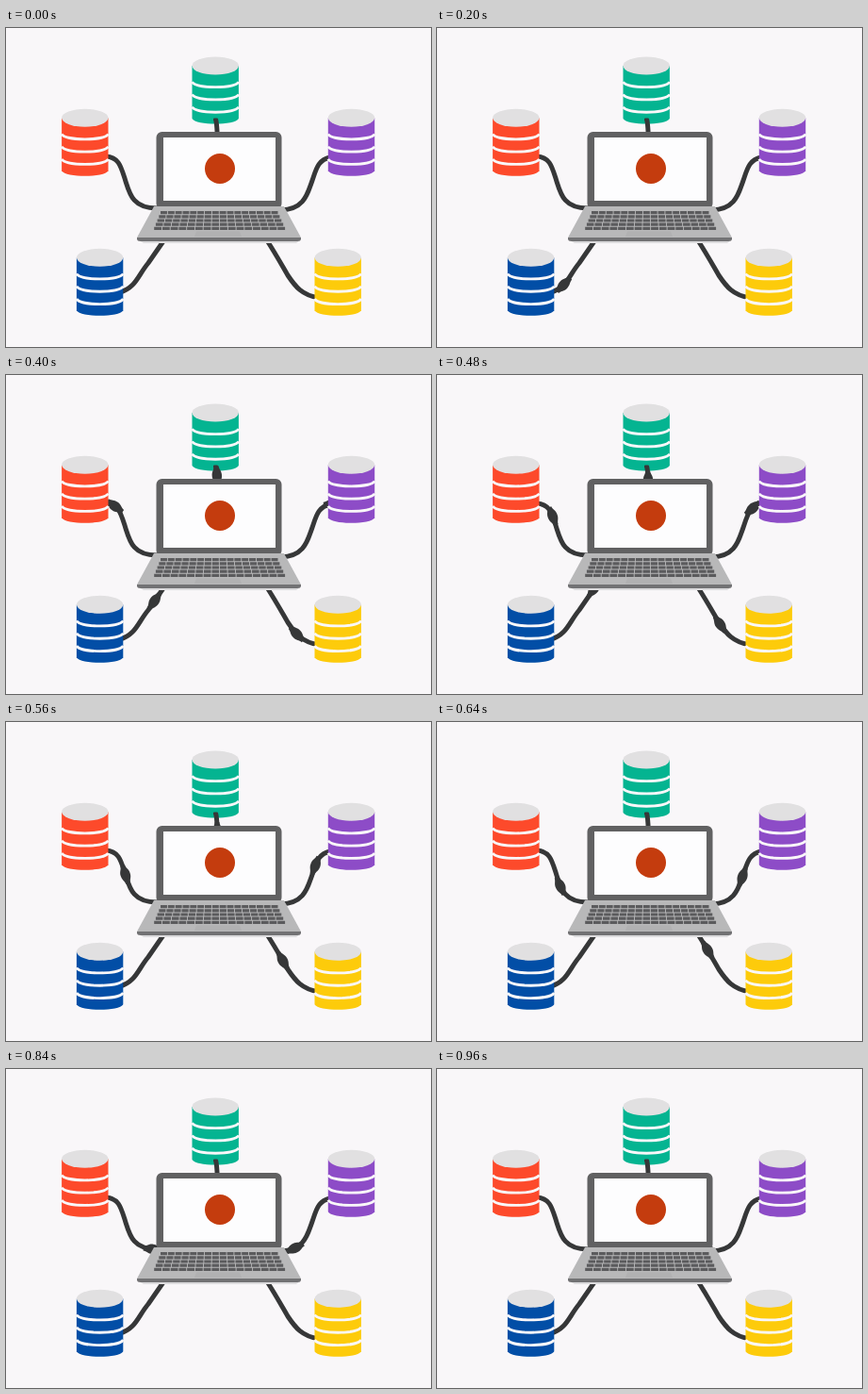
Recreate the animation shown at these times as an HTML page. Size 451 by 338 pixels, loop 1000 ms.

```html
<!DOCTYPE html>
<html lang="en">
<head>
<meta charset="utf-8">
<title>Databases feeding a laptop</title>
<style>
  html, body { margin: 0; width: 100%; height: 100%; overflow: hidden; background: #f9f7f9; }
  svg { display: block; width: 100vw; height: 100vh; }
  .cable { fill: none; stroke: #363738; stroke-width: 5; stroke-linecap: round; }
  .pulse { fill: #363738; }
  .gap { fill: none; stroke: #f9f7f9; stroke-width: 2.8; }
</style>
</head>
<body>
<svg viewBox="0 0 451 338" preserveAspectRatio="none">
  <clipPath id="below"><rect x="200" y="95.5" width="46" height="40"/></clipPath>
  <rect width="451" height="338" fill="#f9f7f9"/>
  <g id="back"></g>
  <g id="stores"></g>
  <g id="front" clip-path="url(#below)"></g>
  <g id="laptop">
    <path d="M141 225H312L308 228H146Z" fill="#dcdbdd"/>
    <rect x="159.5" y="110" width="133" height="82" rx="6" fill="#616162"/>
    <rect x="167" y="116" width="119" height="67" fill="#fdfdfe"/>
    <circle cx="227" cy="149" r="16" fill="#c43c0e"/>
    <path d="M157 189H295L313 222H139Z" fill="#b8b8b9"/>
    <path d="M139 222H313V223.5Q313 226 309 226H143Q139 226 139 223.5Z" fill="#727274"/>
    <g id="keys" stroke="#5b5b5d" stroke-width="3.2"></g>
    <path d="M202 215.5H248L250 221H200Z" fill="#b1b1b2"/>
  </g>
</svg>
<script>
const LOOP = 1000, STEP = 40;
const $ = id => document.getElementById(id);

function add(parent, tag, attrs) {
  const el = document.createElementNS("http://www.w3.org/2000/svg", tag);
  for (const k in attrs) el.setAttribute(k, attrs[k]);
  parent.append(el);
  return el;
}

const stores = [
  { x: 222.2, y: 30.5, color: "#04b491" },
  { x: 83.8, y: 85.7, color: "#fd4a2b" },
  { x: 366.5, y: 85.7, color: "#8d4cc7" },
  { x: 99.6, y: 233.8, color: "#024ea6" },
  { x: 352.2, y: 233.8, color: "#fdcb0b" }
];

// Speed is in pixels per millisecond along the cable
const cables = [
  { layer: "back", start: 75, speed: 0.2,
    d: "M112 282L121 280C138 275 140 262 151 249L169 223L175 214" },
  { layer: "back", start: 172, speed: 0.163,
    d: "M342 289L332 286C314 283 307 274 299 262C292 250 286 239 275 222L269 212" },
  { layer: "front", start: 240, speed: 0.06,
    d: "M222.5 97Q224 101 224.5 122" },
  { layer: "back", start: 286, speed: 0.16,
    d: "M98 136H106C120 137 122 147 126.5 161S134 191 160 191H172" },
  { layer: "back", start: 355, speed: 0.16,
    d: "M354 137H344C330 140 329 151 324.5 163S317 192 292 193H278" }
];

function drawStore({ x, y, color }) {
  const R = 24.7, TOP = 9.5, BASE = 65.5, PITCH = 13.3, SAG = 7.4;
  const arc = e => `M${-R} ${e}C${-R + 4} ${e + SAG} ${R - 4} ${e + SAG} ${R} ${e}`;
  const g = add($("stores"), "g", { transform: `translate(${x} ${y})` });
  add(g, "path", { d: `${arc(BASE)}V${TOP}H${-R}Z`, fill: color });
  for (let i = 1; i <= 3; i++) add(g, "path", { d: arc(BASE - i * PITCH + 1), class: "gap" });
  add(g, "ellipse", { cy: TOP, rx: R, ry: TOP, fill: "#e1e0e1" });
}

function drawKeys() {
  for (let r = 0; r < 5; r++) {
    const x1 = 164 - 1.7 * r, x2 = 288.5 + 1.9 * r, y = 195.6 + 4.2 * r;
    const pitch = (x2 - x1 + 0.9) / 16;
    add($("keys"), "line", { x1, x2, y1: y, y2: y, "stroke-dasharray": `${pitch - 0.9} 0.9` });
  }
}

function makeCable({ layer, start, speed, d }) {
  const path = add($(layer), "path", { d, class: "cable" });
  const pulse = add($(layer), "path", {
    d: "M-10 -2.4C-6 -2.7 -5 -5.2 0 -5.2S6 -2.7 10 -2.4V2.4C6 2.7 5 5.2 0 5.2S-6 2.7 -10 2.4Z",
    class: "pulse"
  });
  return { path, pulse, start, speed, length: path.getTotalLength() };
}

function place({ path, pulse, start, speed, length }, t) {
  const s = (t - start) * speed;
  const shown = s >= 0 && s <= length;
  pulse.style.display = shown ? "" : "none";
  if (!shown) return;
  const p = path.getPointAtLength(s);
  const a = path.getPointAtLength(Math.max(0, s - 3)), b = path.getPointAtLength(s + 3);
  const turn = Math.atan2(b.y - a.y, b.x - a.x) * 180 / Math.PI;
  pulse.setAttribute("transform", `translate(${p.x} ${p.y}) rotate(${turn})`);
}

stores.forEach(drawStore);
drawKeys();
const lines = cables.map(makeCable);

const begin = performance.now();
function frame() {
  const t = Math.max(0, performance.now() - begin) % LOOP;
  const held = Math.floor(t / STEP) * STEP;
  lines.forEach(l => place(l, held));
  requestAnimationFrame(frame);
}
frame();
</script>
</body>
</html>
```
